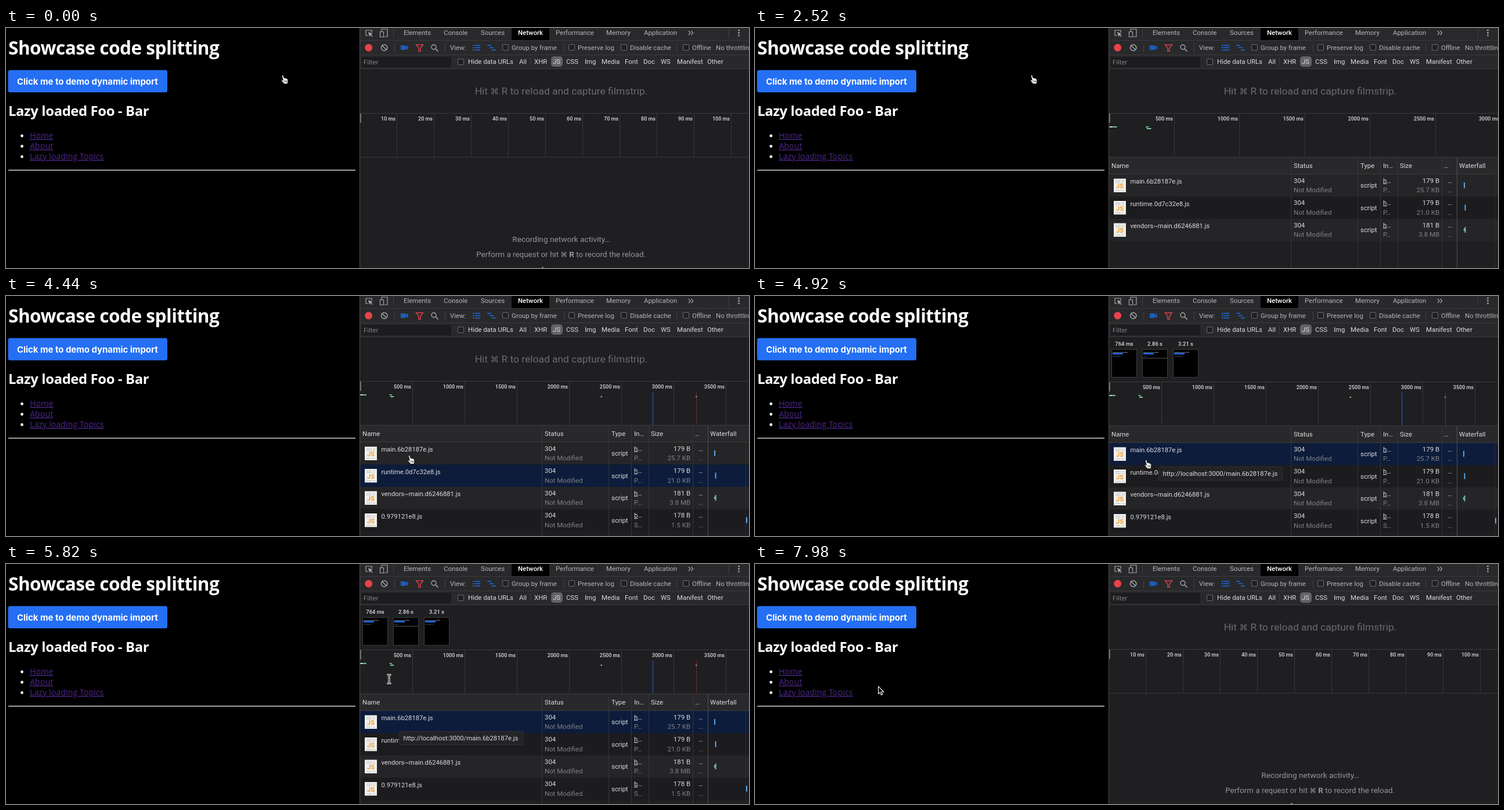
Animation of 1280 by 415 pixels, one loop 8 s. Source, as an HTML page:

```html
<!DOCTYPE html>
<html lang="en">
<head>
<meta charset="utf-8">
<title>Code splitting demo</title>
<style>
  html, body { margin: 0; width: 100%; height: 100%; overflow: hidden; background: #000; }
  svg { display: block; width: 1280px; height: 415px; }
  text { white-space: pre; }
  .page { font-family: "Open Sans", "Noto Sans", sans-serif; }
  .title { letter-spacing: -.015em; }
  .tools { font-family: Roboto, "Liberation Sans", sans-serif; }
  .key { font-family: "DejaVu Sans", sans-serif; font-size: .86em; }
</style>
</head>
<body>
<svg id="stage" viewBox="0 0 1280 415"></svg>
<script>
const LOOP = 8000;
const C = { panel: '#1f1f22', bar: '#29292b', line: '#3b3b3e', text: '#b4b6b9', dim: '#808184',
            bright: '#dcdcde', blue: '#1d5cb8', link: '#4d2788' };

// Moments of change, in ms
const T = { request: 900, done: 2100, chunk: 2880, loading: 3180, parsed: 3240, loaded: 3660,
            hover2: 4260, hover1: 4560, film: 4680, tip1: 4860, tip2: 5460, leave: 6100, clear: 6600 };

const rect = (x, y, w, h, fill, more = '') =>
  `<rect x="${x}" y="${y}" width="${w}" height="${h}" fill="${fill}" ${more}/>`;
const text = (x, y, s, fill = C.text, size = 11.4, more = '') =>
  `<text x="${x}" y="${y}" font-size="${size}" fill="${fill}" ${more}>${s}</text>`;
const path = (d, stroke, more = '') =>
  `<path d="${d}" fill="none" stroke="${stroke}" ${more}/>`;
const during = (from, to, body) => `<g data-from="${from}" data-to="${to}">${body}</g>`;
const END = 'text-anchor="end" ', MID = 'text-anchor="middle" ';
const MEDIUM = 'font-weight="500"', BOLD = 'font-weight="700"';

// Web page on the left
function links(y) {
  return ['Home', 'About', 'Lazy loading Topics'].map((s, i) => {
    const base = y + i * 18;
    return `<circle cx="27.5" cy="${base - 4.5}" r="2.4" fill="#fff"/>` +
      text(41, base, s, C.link, 14.3, 'text-decoration="underline"');
  }).join('') + rect(4, y + 54, 598, 1.5, '#d0d0d0');
}

function page() {
  const title = 'class="title" ' + BOLD;
  const ready = text(4, 152, 'Lazy loaded Foo - Bar', '#fff', 23.8, title) + links(191);
  return `<g class="page">` +
    text(4, 46, 'Showcase code splitting', '#fff', 31.5, title) +
    rect(3.5, 72.7, 274.5, 38.5, '#246ff3', 'rx="3.5"') +
    text(19, 98, 'Click me to demo dynamic import', '#fff', 14.9,
      BOLD + ' style="font-family:Inter,sans-serif"') +
    during(0, T.loading, ready) +
    during(T.loading, T.loaded, text(4, 126, 'Loading...', '#fff', 14.4) + links(159)) +
    during(T.loaded, LOOP, ready) + `</g>`;
}

// Toolbars of the developer tools
const check = (x, y) => rect(x + .5, y + .5, 10, 10, '#202022', 'rx="1.5" stroke="#6b6b6e"');
const divider = (x, y) => rect(x, y, 1, 14, '#414144');

function toolbars() {
  const tabs = [[685, 'Elements'], [754, 'Console'], [818, 'Sources'], [947, 'Performance'],
                [1034, 'Memory'], [1099, 'Application']];
  const options = [[871, 'Group by frame'], [985, 'Preserve log'], [1075, 'Disable cache'], [1182, 'Offline']];
  const types = [[884, 'All'], [910, 'XHR'], [942, 'JS'], [965, 'CSS'], [997, 'Img'], [1026, 'Media'],
                 [1066, 'Font'], [1098, 'Doc'], [1128, 'WS'], [1156, 'Manifest'], [1208, 'Other']];
  const icon = '#a5a7aa';
  return rect(610, 0, 670, 70, C.bar) + rect(610, 21, 670, 1, C.line) +
    rect(610, 46, 670, 1, C.line) + rect(610, 70, 670, 1, C.line) +
    // tab bar
    path('M624 13h-4v-9h10v4', icon, 'stroke-width="1.2"') +
    `<path d="M624 7l8 3-3.2 1.3 3 3-1 1-3-3-1.5 3z" fill="${icon}"/>` +
    path('M647 6v-4h10v13h-5M644.5 6.5h6v9h-6z', icon, 'stroke-width="1.2"') +
    rect(667, 2, 1, 15, '#414144') + rect(871, 0, 65, 21, '#000') +
    text(882, 12, 'Network', '#fff', 11.4, MEDIUM) +
    tabs.map(([x, s]) => text(x, 12, s)).join('') +
    path('M1176 5l3 3.5-3 3.5M1180.5 5l3 3.5-3 3.5', icon, 'stroke-width="1.2"') +
    rect(1245, 2, 1, 15, '#414144') +
    [4, 8.5, 13].map(y => `<circle cx="1262.5" cy="${y}" r="1.4" fill="${icon}"/>`).join('') +
    // controls
    `<circle cx="624.7" cy="34" r="6.4" fill="#e8434c"/>` +
    `<circle cx="651.7" cy="34" r="5.2" fill="none" stroke="${icon}" stroke-width="1.5"/>` +
    path('M648 30.300l7.400 7.400', icon, 'stroke-width="1.5"') +
    `<path d="M680 30h8.5v2.600l4-2.600v8l-4-2.600v2.600h-8.500z" fill="${C.blue}"/>` +
    path('M706.500 29h12l-4.500 5.500v5.500h-3v-5.500z', '#d8414b', 'stroke-width="1.5"') +
    `<circle cx="737" cy="33" r="4" fill="none" stroke="${icon}" stroke-width="1.4"/>` +
    path('M740 36l4.500 4.500', icon, 'stroke-width="1.7"') +
    text(765, 38, 'View:') +
    [29, 33, 37].map(y => rect(804, y, 3, 2, C.blue) + rect(808, y, 9, 2, C.blue)).join('') +
    rect(829, 29, 7, 2, C.blue) + rect(833, 33, 7, 2, C.blue) + rect(837, 37, 7, 2, C.blue) +
    [669, 756, 961, 1155].map(x => divider(x, 27)).join('') +
    options.map(([x, s]) => check(x - 16, 28) + text(x, 38, s)).join('') +
    text(1223, 38, 'No throttling') +
    // filter
    rect(613, 50, 154, 18, '#1c1c1f') + text(616, 63, 'Filter', C.dim) +
    check(778, 53) + text(796, 62, 'Hide data URLs', C.bright) + divider(903, 51) +
    rect(939, 49, 20, 18, '#636365', 'rx="5"') +
    types.map(([x, s]) => text(x, 62, s, C.bright)).join('');
}

// Overview ruler: scale is px per ms
function ruler(scale, step, count) {
  let out = rect(610, 147, 670, 1, C.line) + rect(610, 223, 670, 1, C.line) +
    rect(610, 148, 2, 16, '#6d6d70');
  for (let i = 1; i <= count; i++) {
    const x = Math.floor(610 + i * step * scale);
    out += rect(x, 148, 1, 75, '#37373a') + text(x - 2, 160, i * step + ' ms', C.bright, 9, END + MEDIUM);
  }
  return out;
}
const span = (scale, from, to, y, fill) =>
  rect(610.5 + from * scale, y, Math.max((to - from) * scale, 2.5), 2, fill);
const mark = (scale, ms, fill) => rect(Math.round(610 + ms * scale), 166, 1, 57, fill);

const requests = scale =>
  span(scale, 0, 24, 170, '#d8d8d8') + span(scale, 24, 58, 170, '#6fc58d') +
  span(scale, 278, 302, 170, '#6fae7e') + span(scale, 286, 320, 173, '#7fc995');
const chunk = scale => span(scale, 2300, 2312, 173, '#8fbf9b');

// Request table
const COLUMNS = [923, 1038, 1077, 1107, 1183];
const ROW = 38.5, TOP = 253;
const files = [
  { name: 'main.6b28187e.js', from: 'h', kind: 'P…', sent: '179 B', size: '25.7 KB' },
  { name: 'runtime.0d7c32e8.js', from: 'h', kind: 'P…', sent: '179 B', size: '21.0 KB' },
  { name: 'vendors~main.d6246881.js', from: 'h', kind: 'P…', sent: '181 B', size: '3.8 MB' },
  { name: '0.979121e8.js', from: 'b', kind: 'S…', sent: '178 B', size: '1.5 KB' }
];

function fileIcon(y) {
  const lines = [3, 6, 20].map(d => rect(621, y + d, 9, 1, '#b9b9b9') + rect(632, y + d, 4, 1, '#c9bda8'));
  return rect(618, y, 21, 23.5, '#f0f0ee') + lines.join('') +
    text(628.5, y + 16.5, 'JS', '#f0a030', 11, MID + BOLD);
}

const rowBack = (i, fill) => rect(610, TOP + i * ROW, 670, ROW, fill);

function row(i, pending) {
  const f = files[i], y = TOP + i * ROW;
  const status = pending
    ? text(928, y + 23, '(pending)', C.dim) + text(1193, y + 24, '…', C.dim)
    : text(928, y + 14.5, '304', C.bright) + text(928, y + 31, 'Not Modified', C.dim) +
      text(1193, y + 14.5, '…', C.bright) + text(1193, y + 31, '…', C.dim);
  return fileIcon(y + 7.5) + text(646.5, y + 16, f.name, C.bright, 11.2) + status +
    text(1043, y + 23, 'script', C.bright) +
    text(1082, y + 14.5, `<tspan text-decoration="underline">${f.from}</tspan>…`, C.bright) +
    text(1082, y + 31, f.kind, C.dim) +
    text(1179, y + 14.5, pending ? '0 B' : f.sent, C.bright, 11.4, END) +
    text(1179, y + 31, pending ? '0 B' : f.size, C.dim, 11.4, END);
}

const stripes = n => [0, 1, 2, 3].slice(0, n)
  .map(i => rowBack(i, i % 2 ? '#1c1c1f' : '#252527')).join('');

function tableHead() {
  const heads = [[614, 'Name'], [928, 'Status'], [1043, 'Type'], [1082, 'In…'], [1111, 'Size'],
                 [1187, '…'], [1213, 'Waterfall']];
  return rect(610, 224, 670, 28, C.bar) + rect(610, 252, 670, 1, C.line) +
    heads.map(([x, s]) => text(x, 242, s, C.bright)).join('');
}
const columns = () => COLUMNS.map(x => rect(x, 224, 1, 191, '#353538')).join('') +
  rect(1209, 224, 1, 191, '#505053') + rect(1274, 253, 1, 162, '#2d2d30');

const bar = (i, x, fill = '#58a6e8') => rect(x, TOP + i * ROW + 14, 2, 10, fill);
const bars = shift => bar(0, 1221 - shift) + bar(1, 1222.5 - shift) +
  bar(2, 1222.5 - shift, '#68bfc0') + rect(1221 - shift, TOP + 2 * ROW + 17, 1.5, 4, '#a8d8b0');

const command = '<tspan class="key">⌘</tspan>';

function emptyNote() {
  const grey = '#96979a';
  return text(956.5, 370, 'Recording network activity…', grey, 13.65, MID) +
    text(956.2, 396, `Perform a request or hit ${command} <tspan ${BOLD}>R</tspan> to record the reload.`,
      grey, 13.45, MID) + rect(923.5, 413, 2, 2, '#a8a8aa');
}

function filmstrip() {
  return [[614, '764 ms'], [667, '2.86 s'], [720, '3.21 s']].map(([x, s], i) =>
    text(x + 22, 86, s, C.bright, 9.4, MID + MEDIUM) +
    rect(x + .5, 92.5, 43, 48, '#000', 'stroke="#3c3c3f"') +
    text(x + 2, 97.5, 'Showcase code splitting', '#ddd', 2.4, BOLD) +
    rect(x + 2, 98.5, 18, 2.5, '#246ff3') +
    text(x + 2, 104.5, i === 1 ? 'Loading...' : 'Lazy loaded Foo', '#aaa', 1.9) +
    (i === 1 ? rect(x + 1, 107, 42, .7, '#777') : '')).join('');
}

function tip(x, y) {
  return rect(x + .5, y + .5, 213, 23, '#232326', 'stroke="#313135" rx="1"') +
    text(x + 7.5, y + 16, 'http://localhost:3000/main.6b28187e.js', C.bright, 11.2);
}

function network() {
  const hint = text(956.5, 115, `Hit ${command} R to reload and capture filmstrip.`, '#6b6b6e', 17.4, MID);
  const idle = ruler(6.394, 10, 10) + emptyNote();
  const early = ruler(2.095, 50, 6) + rect(611, 170, 50, 2, '#dadada') + rect(661, 170, 30, 2, '#8d8f8d') +
    rect(691, 170, 30, 2, '#49b53f') + rect(721, 170, 6, 2, '#4e9fd8');
  const mid = .2249, late = .18;
  const rows = (n, pending) => [0, 1, 2, 3].slice(0, n).map(i => row(i, pending)).join('');
  const hover = '#0d1c3b';
  return rect(610, 71, 670, 344, C.panel) +
    during(0, T.film, hint) + during(T.film, T.clear, filmstrip()) + during(T.clear, LOOP, hint) +
    `<g id="lower">` +
    during(0, T.request, idle) + during(T.clear, LOOP, idle) +
    during(T.request, T.done, early) +
    during(T.done, T.loaded, ruler(mid, 500, 5) +
      text(1247, 160, '3000 ms', C.bright, 9, MEDIUM) + requests(mid)) +
    during(T.chunk, T.loaded, chunk(mid)) +
    during(T.parsed, T.loaded, mark(mid, 2810, '#2563c9')) +
    during(T.loaded, T.clear, ruler(late, 500, 7) + requests(late) + chunk(late) +
      mark(late, 2800, '#2563c9') + mark(late, 3217, '#6d2c31') + span(late, 3208, 3218, 173, '#9a8f86')) +
    during(T.request, T.clear, tableHead() + stripes(3)) +
    during(T.chunk, T.clear, rowBack(3, '#1c1c1f')) +
    during(T.hover2, T.hover1, rowBack(1, hover)) + during(T.hover1, T.leave, rowBack(0, hover)) +
    during(T.request, T.clear, columns()) +
    during(T.request, T.done, rows(3, true)) +
    during(T.done, T.clear, rows(3, false)) + during(T.chunk, T.clear, row(3, false)) +
    during(T.done, T.loaded, bars(0)) +
    during(T.loaded, T.clear, bars(1) + bar(3, 1275)) +
    `</g>` +
    during(T.tip1, T.tip2, tip(695, 295)) + during(T.tip2, T.leave, tip(677, 289));
}

// Pointer: [ms, x, y]
const route = [[0, 479, 90], [3720, 479, 90], [4200, 712, 316], [4440, 697, 284], [4800, 676, 292],
  [5160, 676, 292], [5400, 660, 284], [5700, 660, 199], [6060, 660, 199], [6480, 655, 41],
  [6720, 655, 41], [7800, 216, 219], [LOOP, 216, 219]];

function pointer() {
  const hand = `<g transform="translate(0 -1)">` +
    `<path d="M-3.800-7q1.800-1.200 2.600.6l1.300 3.900 1.200-.3 1.200.8 1.300-.2 1 1 1.200.2.800 2.500-.3 3.500-.7 2.500h-5.800l-2-2.600-2.500-3q.200-1.700 1.900-.9l1.100.7z" fill="#fff" stroke="#000" stroke-width=".8"/>` +
    path('M.8 1.500v3.500M2.800 1.500v3.500M4.600 1.500v3.500', '#000', 'stroke-width=".7"') + `</g>`;
  const beamShape = 'M-3.500-7.500q3.500 0 3.500 2.500v10q0 2.500-3.500 2.500M3.500-7.500q-3.500 0-3.500 2.500M0 5q0 2.500 3.500 2.500M-2 1.500h4';
  const beam = path(beamShape, '#fff', 'stroke-width="3"') + path(beamShape, '#111', 'stroke-width="1"');
  const arrow = `<path d="M-3.500-7.500v13l3-2.700 2 4.700 2.200-1-2-4.500h4z" fill="#000" stroke="#fff" stroke-width="1.1"/>`;
  return `<g id="pointer">` + during(0, 5520, hand) + during(5520, 6100, beam) + during(6100, LOOP, arrow) + `</g>`;
}

const stage = document.getElementById('stage');
stage.innerHTML = rect(0, 0, 1280, 415, '#000') + page() +
  `<g class="tools">` + network() + toolbars() + rect(609, 0, 1, 415, '#4a4a4d') + `</g>` + pointer();

const timed = [...stage.querySelectorAll('[data-from]')]
  .map(el => ({ el, from: +el.dataset.from, to: +el.dataset.to }));
const lower = document.getElementById('lower');
const cursor = document.getElementById('pointer');

function draw(t) {
  for (const { el, from, to } of timed) el.style.display = t >= from && t < to ? '' : 'none';
  lower.setAttribute('transform', `translate(0 ${t >= T.film && t < T.clear ? 1 : 0})`);
  const next = route.findIndex(p => p[0] > t);
  const [t0, x0, y0] = route[next - 1], [t1, x1, y1] = route[next];
  const k = (t - t0) / (t1 - t0), e = k * k * (3 - 2 * k);
  cursor.setAttribute('transform', `translate(${x0 + (x1 - x0) * e} ${y0 + (y1 - y0) * e})`);
}

const start = performance.now();
function tick() {
  draw((performance.now() - start) % LOOP);
  requestAnimationFrame(tick);
}
tick();
</script>
</body>
</html>
```
